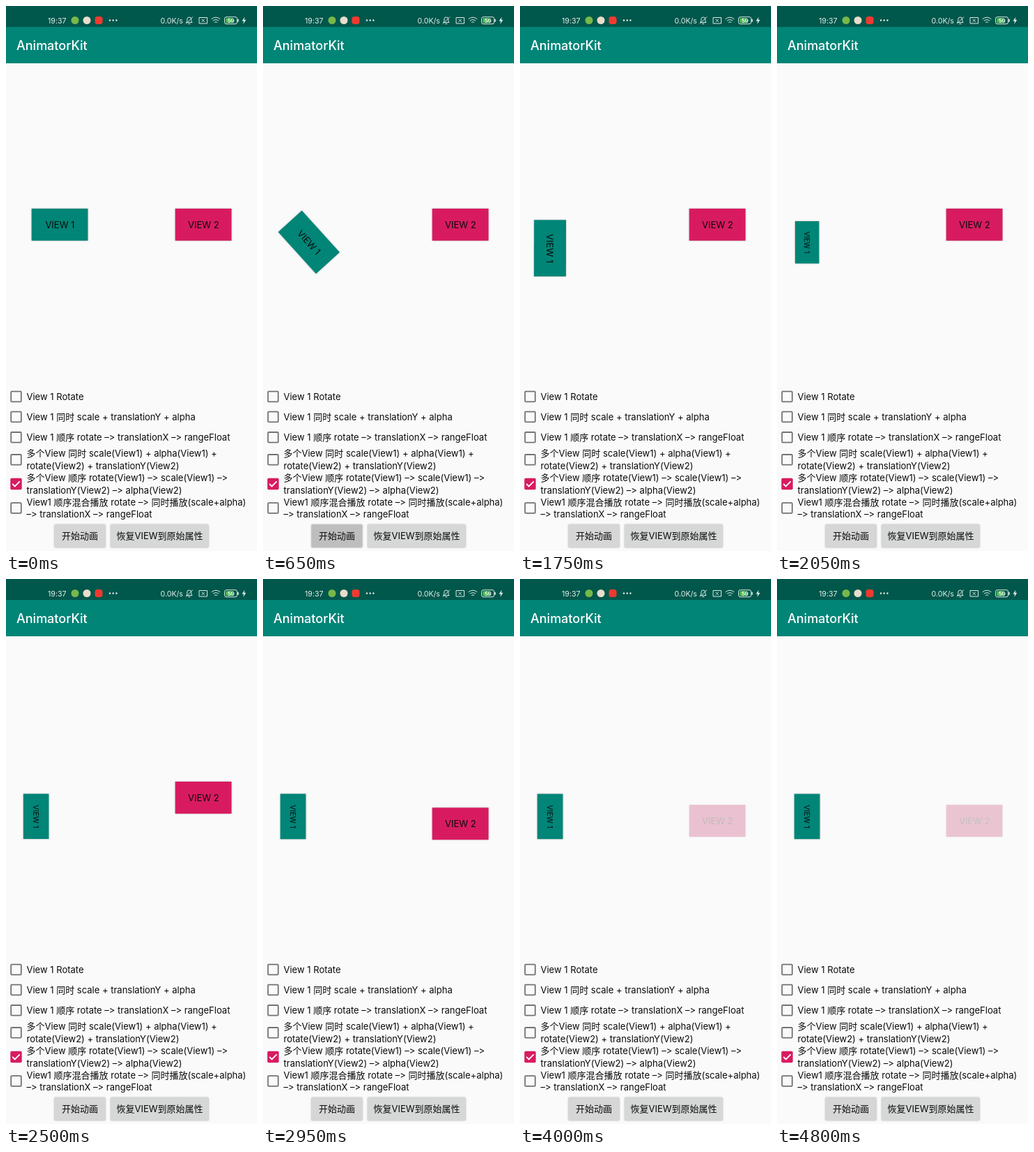
Animation, 360 px wide and 780 px high, one loop 5.2 s. Source, as an HTML page:

```html
<!DOCTYPE html>
<html lang="zh-CN">
<head>
<meta charset="utf-8">
<style>
  html, body { margin: 0; width: 100%; height: 100%; overflow: hidden; background: #fafafa; }
  svg { display: block; width: 360px; height: 780px; }
  text {
    font: 13px Inter, "Noto Sans CJK SC", "Noto Sans CJK", sans-serif;
    font-feature-settings: "calt" 0;
    fill: #0a0a0a;
    white-space: pre;
  }
  .mid { text-anchor: middle; }
  .title { font-size: 18px; font-weight: 500; fill: #fff; }
  .status text { font-size: 10.6px; fill: #e6efed; }
  .status .level { font-size: 8px; font-weight: 600; fill: #fff; }
  .line { fill: none; stroke: #dce8e6; stroke-width: 1; }
  .raised { filter: drop-shadow(0 .8px 1.2px rgba(0, 0, 0, .3)); }
</style>
</head>
<body>
<svg viewBox="0 0 360 780">
  <rect width="360" height="780" fill="#fafafa"/>
  <rect width="360" height="82" fill="#008577"/>
  <rect width="360" height="30" fill="#00574b"/>
  <text class="title" x="15" y="63">AnimatorKit</text>

  <g class="status">
    <text x="60" y="24.5">19:37</text>
    <circle cx="99" cy="20.5" r="5.5" fill="#78b84a"/>
    <circle cx="116" cy="20.5" r="5.5" fill="#e9dccb"/>
    <rect x="127.5" y="15" width="11" height="11" rx="3.5" fill="#ee3a30"/>
    <g fill="#e6efed">
      <circle cx="149" cy="20.5" r="1.2"/><circle cx="153.7" cy="20.5" r="1.2"/><circle cx="158.4" cy="20.5" r="1.2"/>
    </g>
    <text x="221.5" y="24.5">0.0K/s</text>
    <path class="line" d="M258.5 23.5h8.5l-1.2-2v-2.5a3 3 0 0 0-6 0v2.5zM261.3 25.5h3M258 25.5l10-10"/>
    <path class="line" d="M277 16.5h11.5v8.5h-11.5zM280.7 18.7l4 4M284.7 18.7l-4 4"/>
    <path class="line" d="M294.7 18.7q6.3-5 12.6 0M296.8 21.2q4.2-3.2 8.4 0M299 23.5q2-1.5 4 0"/>
    <rect x="313.5" y="15.7" width="18" height="10" rx="2.5" class="line"/>
    <rect x="315" y="17.2" width="10" height="7" rx="1" fill="#43b84a"/>
    <rect x="332.3" y="18.7" width="1.5" height="4" fill="#dce8e6"/>
    <text class="level mid" x="322.7" y="23.6">59</text>
    <path d="M342.5 15.5l-4 6h2.6l-1 4.5 4.2-6.2h-2.7z" fill="#e6efed"/>
  </g>

  <g class="raised"><g id="view1">
    <rect x="36.7" y="290" width="80.7" height="45.8" fill="#008577"/>
    <text class="mid" x="77.4" y="317.8">VIEW 1</text>
  </g></g>
  <g id="view2">
    <rect id="shade" x="242.7" y="290" width="80.7" height="45.8" fill="#f0f0f0"/>
    <g id="face" class="raised">
      <rect x="242.7" y="290" width="80.7" height="45.8" fill="#d81b60"/>
      <text class="mid" x="283.3" y="317.8">VIEW 2</text>
    </g>
  </g>

  <g id="options"></g>

  <g class="raised">
    <rect id="start" x="69.5" y="742" width="73" height="33" rx="1.5" fill="#d6d7d7"/>
    <rect x="150" y="742" width="140.5" height="33" rx="1.5" fill="#d6d7d7"/>
  </g>
  <text class="mid" x="106" y="763">开始动画</text>
  <text class="mid" x="220.5" y="763">恢复VIEW到原始属性</text>
</svg>
<script>
const LOOP = 5200, OMEGA = 14.14, DAMPING = 0.4;
const $ = id => document.getElementById(id);
const set = (id, name, value) => $(id).setAttribute(name, value);

const options = [
  [559, 'View 1 Rotate'],
  [588, 'View 1 同时 scale + translationY + alpha'],
  [617.3, 'View 1 顺序 rotate –> translationX –> rangeFloat'],
  [649.3, '多个View 同时 scale(View1) + alpha(View1) +', 'rotate(View2) + translationY(View2)'],
  [684, '多个View 顺序 rotate(View1) –> scale(View1) –>', 'translationY(View2) –> alpha(View2)'],
  [718.5, 'View1 顺序混合播放 rotate –> 同时播放(scale+alpha)', '–> translationX –> rangeFloat'],
];
$('options').innerHTML = options.map(([y, ...lines], i) => {
  const box = i === 4
    ? `<rect x="6.3" y="${y - 8.2}" width="16.4" height="16.4" rx="1.8" fill="#d81b60"/>
       <path d="M9.3 ${y}l3.4 3.4 7-7" fill="none" stroke="#fff" stroke-width="1.8"/>`
    : `<rect x="7.2" y="${y - 7.3}" width="14.6" height="14.6" rx="1" fill="none" stroke="#737373" stroke-width="1.8"/>`;
  const first = y + 4.8 - (lines.length - 1) * 8.7;
  return box + lines.map((s, n) =>
    `<text x="29.5" y="${first + n * 17.6}">${s.replace(/>/g, '&gt;')}</text>`).join('');
}).join('');

// Underdamped spring from 0 to 1, released at the given time.
function spring(t, start) {
  const s = (t - start) / 1000;
  if (s <= 0) return 0;
  const root = Math.sqrt(1 - DAMPING * DAMPING), phase = OMEGA * root * s;
  return 1 - Math.exp(-DAMPING * OMEGA * s) * (Math.cos(phase) + DAMPING / root * Math.sin(phase));
}
const clamp = v => Math.max(0, Math.min(1, v));

function draw(t) {
  const angle = 90 * spring(t, 560);
  const scale = 1 - 0.2 * spring(t, 1800);
  const drop = 33.2 * spring(t, 2620);
  const alpha = clamp(1 - 0.8 * spring(t, 3590));
  set('view1', 'transform',
    `translate(43.2 312.8) rotate(${angle}) scale(${scale}) translate(-43.2 -312.8)`);
  set('view2', 'transform', `translate(0 ${drop})`);
  set('face', 'opacity', alpha);
  set('shade', 'opacity', clamp(alpha * 5));

  const press = clamp((t - 430) / 150) * clamp((1200 - t) / 220);
  const grey = Math.round(214 - 24 * press);
  set('start', 'fill', `rgb(${grey},${grey},${grey})`);
}

const origin = performance.now();
function tick() {
  draw((performance.now() - origin) % LOOP);
  requestAnimationFrame(tick);
}
tick();
</script>
</body>
</html>
```
